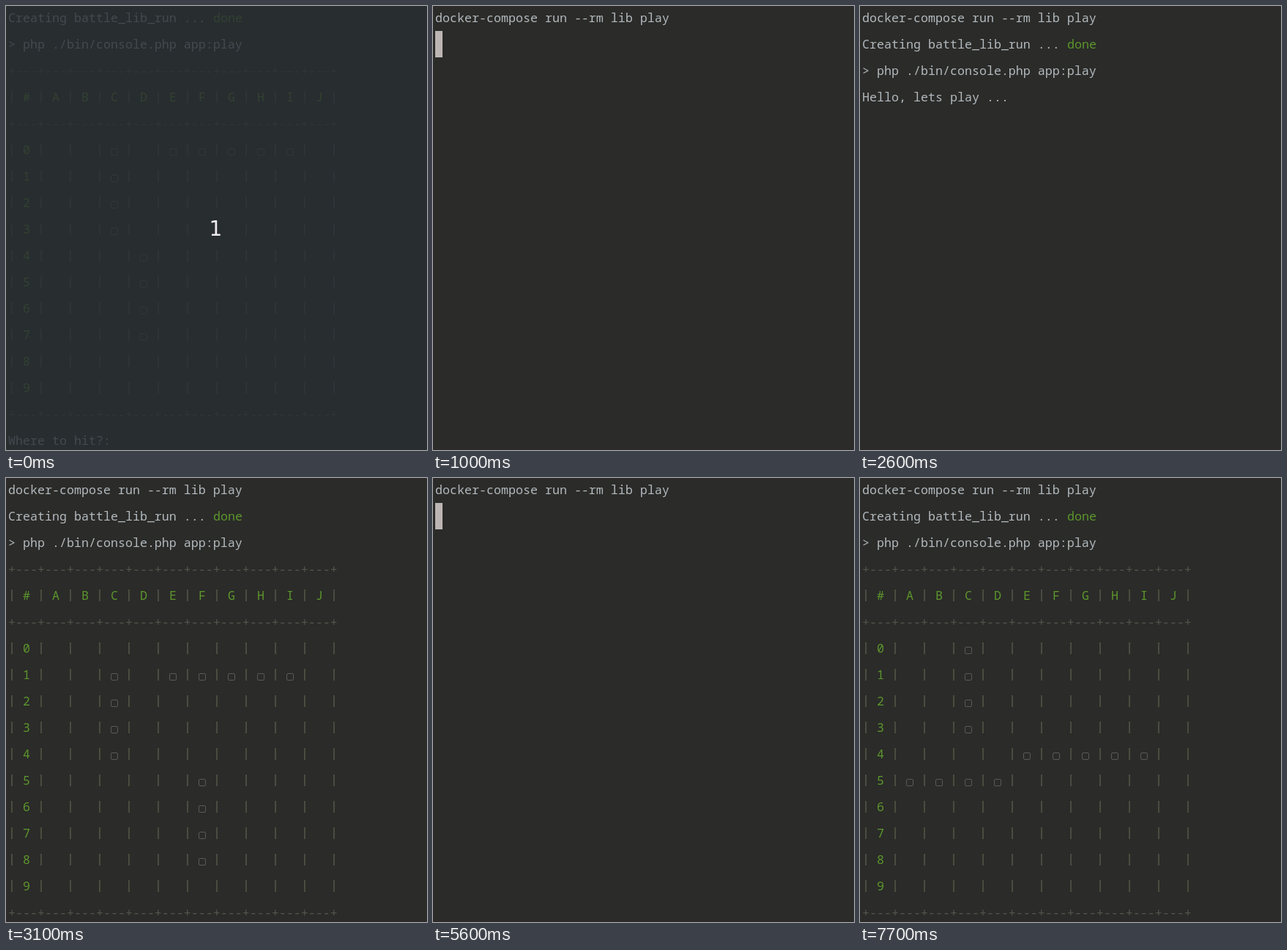
Recreate the animation shown at these times as an HTML page with a canvas. Size 575 px wide and 605 px high, loop 8000 ms.

```html
<!DOCTYPE html>
<html lang="en">
<head>
<meta charset="utf-8">
<title>Terminal game</title>
<style>
html, body { margin: 0; width: 100%; height: 100%; overflow: hidden; background: #2b2b29; }
canvas { display: block; }
</style>
</head>
<body>
<canvas id="stage" width="575" height="605"></canvas>
<script>
const ctx = document.getElementById('stage').getContext('2d');
const LOOP = 8000, CELL = 10, LINE = 36, LEFT = 3, BASE = 22;
const BG = '#2b2b29', TEXT = '#b2b9be', GREEN = '#5c962c';
const RULE = '#55544c', PIPE = '#5c5a4b', SHIP = '#595957', CURSOR = '#bbb6b3';
const MONO = '16.6667px "Noto Sans Mono", "DejaVu Sans Mono", monospace';

// Ships: [column, row, length, vertical]
const fleets = [
  [[2, 0, 4, 1], [4, 0, 5, 0], [3, 4, 4, 1]],
  [[2, 1, 4, 1], [4, 1, 5, 0], [5, 5, 4, 1]],
  [[2, 0, 4, 1], [4, 4, 5, 0], [0, 5, 4, 0]]
];

const colX = col => LEFT + col * CELL;
const rowY = row => BASE + row * LINE;

function write(row, col, text, color = TEXT) {
  ctx.fillStyle = color;
  ctx.fillText(text, colX(col), rowY(row));
}

function cursor(row) {
  ctx.fillStyle = CURSOR;
  ctx.fillRect(LEFT, row * LINE - 2, CELL, LINE);
}

function pipes(row) {
  ctx.fillStyle = PIPE;
  for (let i = 0; i < 12; i++) ctx.fillRect(colX(i * 4) + 4.3, rowY(row) - 14, 1.4, 16);
}

function board(top, fleet) {
  const rule = '+---'.repeat(11) + '+';
  for (const row of [0, 2, 13]) write(top + row, 0, rule, RULE);
  pipes(top + 1);
  [...'#ABCDEFGHIJ'].forEach((name, i) => write(top + 1, 2 + i * 4, name, GREEN));
  for (let i = 0; i < 10; i++) {
    pipes(top + 3 + i);
    write(top + 3 + i, 2, String(i), GREEN);
  }
  ctx.strokeStyle = SHIP;
  ctx.lineWidth = 1;
  for (const [col, row, size, vertical] of fleet) {
    for (let i = 0; i < size; i++) {
      const c = vertical ? col : col + i, r = vertical ? row + i : row;
      ctx.beginPath();
      ctx.roundRect(colX(6 + c * 4) + 0.5, rowY(top + 3 + r) - 7.5, 9, 9, 1.5);
      ctx.stroke();
    }
  }
}

// The first `count` lines of the session, starting at line `first`
function session(count, first = 0) {
  const lines = ['docker-compose run --rm lib play', 'Creating battle_lib_run ... ',
    '> php ./bin/console.php app:play', 'Hello, lets play ...'];
  lines.slice(first, count).forEach((line, row) => {
    write(row, 0, line);
    if (row + first === 1) write(row, line.length, 'done', GREEN);
  });
}

function typed(count, withCursor = true) {
  session(count);
  if (withCursor) cursor(count);
}

function fresh(fleet) {
  session(3);
  board(3, fleet);
}

function prompt(fleet) {
  session(3, 1);
  board(2, fleet);
  write(16, 0, 'Where to hit?:');
}

function countdown() {
  prompt(fleets[0]);
  ctx.fillStyle = 'rgba(39, 45, 50, .8)';
  ctx.fillRect(0, 0, 575, 605);
  ctx.font = '28px "DejaVu Sans", sans-serif';
  ctx.textAlign = 'center';
  ctx.fillStyle = '#eeeeee';
  ctx.fillText('1', 286.5, 313);
}

const scenes = [
  [0, countdown],
  [100, () => prompt(fleets[0])],
  [1000, () => typed(1)],
  [1500, () => typed(2)],
  [2000, () => typed(4)],
  [2600, () => typed(4, false)],
  [3100, () => fresh(fleets[1])],
  [5100, () => prompt(fleets[1])],
  [5600, () => typed(1)],
  [6200, () => typed(2)],
  [6700, () => typed(4)],
  [7200, () => typed(4, false)],
  [7600, () => typed(3)],
  [7700, () => fresh(fleets[2])]
];

function render(now) {
  const t = now % LOOP;
  ctx.fillStyle = BG;
  ctx.fillRect(0, 0, 575, 605);
  ctx.font = MONO;
  ctx.textAlign = 'left';
  scenes.findLast(([start]) => start <= t)[1]();
}

const began = performance.now();
function tick() {
  render(performance.now() - began);
  requestAnimationFrame(tick);
}
tick();
</script>
</body>
</html>
```
